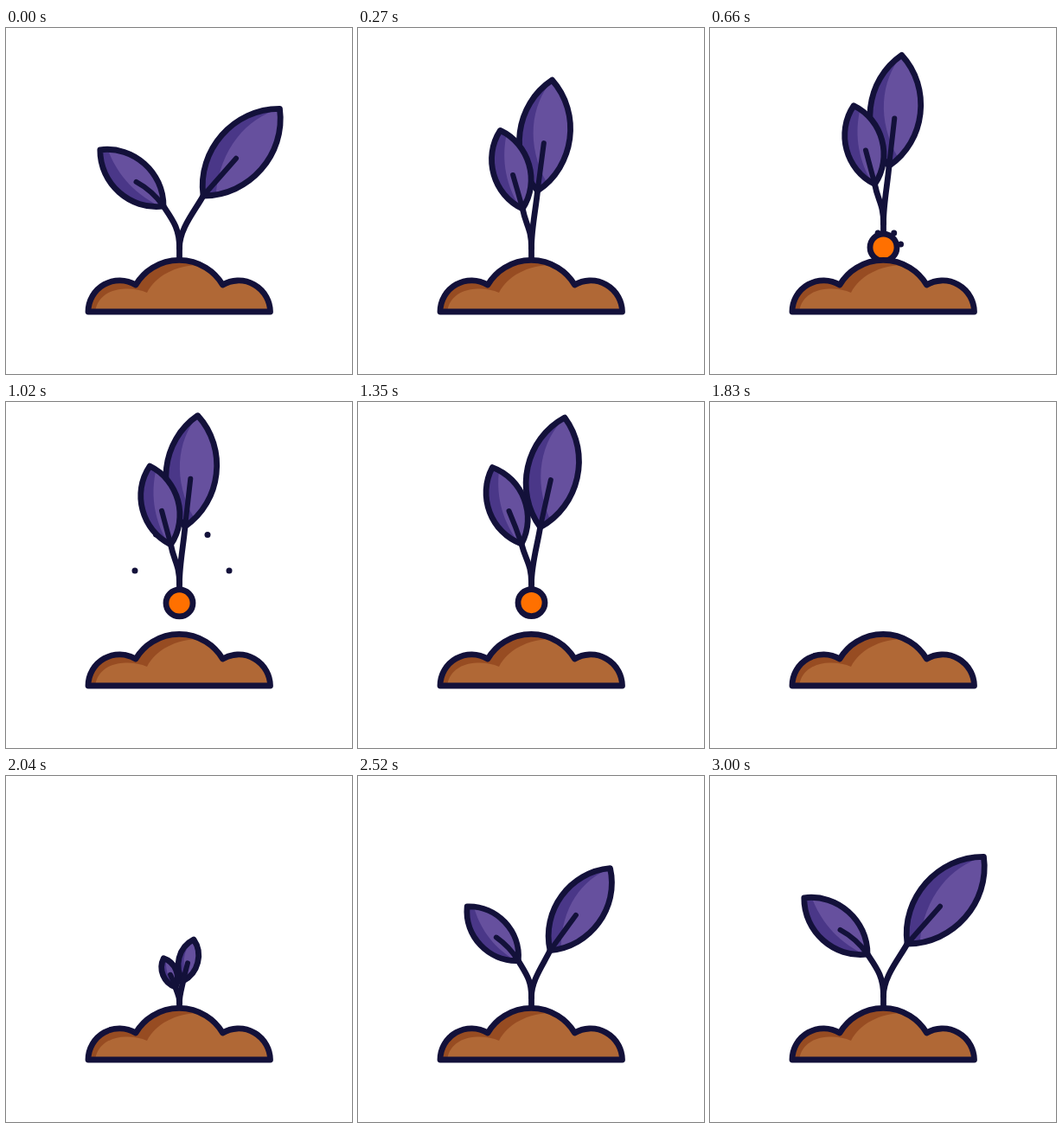
Animation, 400 px wide and 400 px high, one loop 3630 ms. Source, as an HTML page:

```html
<!DOCTYPE html>
<html lang="en">
<head>
<meta charset="utf-8">
<title>Sprout</title>
<style>
  html, body { margin: 0; width: 100%; height: 100%; overflow: hidden; background: #fff; }
  svg { display: block; width: 100vw; height: 100vh; }
  .line { fill: none; stroke: #13113a; stroke-width: 6.8; stroke-linecap: round; stroke-linejoin: round; }
  .vein { stroke-width: 6; }
  .dark { fill: #4a3788; }
  .light { fill: #66509e; }
</style>
</head>
<body>
<svg viewBox="0 0 400 400">
  <defs>
    <path id="mound" d="M95 328A36.300 36.300 0 0 1 150 297A58.500 58.500 0 0 1 250.500 297A36.500 36.500 0 0 1 305.500 328Z"/>
    <clipPath id="inside"><use href="#mound"/></clipPath>
  </defs>
  <g id="dots" fill="#13113a"></g>
  <g id="plant">
    <path id="trunk" class="line"/>
    <g id="right"></g>
    <g id="left"></g>
  </g>
  <circle id="seed" class="line" cx="200.500" r="15.500" style="fill:#ff7000"/>
  <g clip-path="url(#inside)">
    <rect x="90" y="260" width="220" height="70" fill="#974c22"/>
    <path fill="#b06836" d="M103 328C106 309 122 302 138 301.500Q152 301 163 306C173 287 195 274 226 274V260H320V328Z"/>
  </g>
  <use href="#mound" class="line"/>
</svg>
<script>
const LOOP = 3630, X = 200.5, GROUND = 266;
const $ = id => document.getElementById(id);
const mix = (a, b, p) => a + (b - a) * p;

const linear = p => p;
const inOut = p => (1 - Math.cos(Math.PI * p)) / 2;
const sineOut = p => Math.sin(Math.PI * p / 2);
const quadIn = p => p * p;
const cubicIn = p => p ** 3;
const growOut = p => 1 - (1 - p) ** 2.4;

// Each stop is [time, value, easing into it].
const tracks = {
  open: [[30, 1], [300, 0, inOut], [1110, 0], [1650, 0.42, inOut], [1830, 0]],
  size: [[1500, 1], [1650, 0.955, quadIn], [1830, 0, quadIn], [3000, 1, growOut]],
  lift: [[330, 0], [1080, 44.5, sineOut], [1300, 44.5], [1650, 38.5, quadIn], [1830, 0]],
  seed: [[330, 292], [1080, 232, sineOut], [1300, 232], [1830, 292, cubicIn]]
};

function at(stops, t) {
  if (t <= stops[0][0]) return stops[0][1];
  for (let i = 1; i < stops.length; i++) {
    const [t0, v0] = stops[i - 1], [t1, v1, ease = linear] = stops[i];
    if (t < t1) return mix(v0, v1, ease((t - t0) / (t1 - t0)));
  }
  return stops[stops.length - 1][1];
}

// Pairs hold the closed and the open pose, relative to the root.
// The shade is the curve from tip to base that bounds the dark side, in leaf lengths.
const leaves = {
  right: {
    x: [6.5, 27.5], y: [-78, -72], turn: [6.5, 41.3], length: [129, 134], belly: 0.3, bend: 0,
    shade: [[0, -1], [-0.16, -0.75], [-0.16, -0.4], [0.075, -0.08]]
  },
  left: {
    x: [-10, -18.5], y: [-57, -60], turn: [-15, -48.3], length: [94, 98], belly: 0.3, bend: 0.05,
    shade: [[0.06, -0.93], [-0.06, -0.7], [-0.13, -0.4], [-0.03, -0.03]]
  }
};

function addShape(parent, tag, className) {
  const el = document.createElementNS('http://www.w3.org/2000/svg', tag);
  if (className) el.setAttribute('class', className);
  return parent.appendChild(el);
}

for (const id in leaves) {
  const leaf = leaves[id];
  leaf.stem = addShape($(id), 'path', 'line');
  leaf.blade = addShape($(id), 'g');
  for (const part of ['light', 'dark', 'line', 'vein'])
    leaf[part] = addShape(leaf.blade, 'path', part === 'vein' ? 'line vein' : part);
}

function drawLeaf(leaf, open, size, root) {
  const pose = key => mix(...leaf[key], open);
  const x = X + pose('x') * size, y = root + pose('y') * size;
  const turn = pose('turn'), L = pose('length') * size, w = leaf.belly * L;
  const a = turn * 0.7 * Math.PI / 180, reach = 20 * size;
  const near = -0.26 * L, far = -0.74 * L;
  const leftEdge = `M0 0C${-w} ${near} ${-w} ${far} 0 ${-L}`;
  const outline = `${leftEdge}C${w} ${far} ${w} ${near} 0 0Z`;
  const [top, ...curve] = leaf.shade.map(([sx, sy]) => `${sx * L} ${sy * L}`);

  leaf.stem.setAttribute('d', `M${X} ${root - 12 * size}C${X} ${root - 34 * size} ` +
    `${x - Math.sin(a) * reach} ${y + Math.cos(a) * reach} ${x} ${y}`);
  leaf.blade.setAttribute('transform', `translate(${x} ${y}) rotate(${turn})`);
  leaf.light.setAttribute('d', outline);
  leaf.line.setAttribute('d', outline);
  leaf.dark.setAttribute('d', `${leftEdge}L${top}C${curve.join(' ')}Z`);
  leaf.vein.setAttribute('d', `M0 0Q${leaf.bend * open * L} ${-0.22 * L} 0 ${-0.43 * L}`);
}

const crumbs = [[-54.5, 195], [-30, 153], [29.5, 153.5], [54.5, 195]]
  .map(([dx, top]) => ({ dx, top, el: addShape($('dots'), 'circle') }));

function drawCrumbs(t) {
  const p = sineOut(Math.min(1, Math.max(0, (t - 570) / 450)));
  const r = t < 570 ? 0 : at([[1080, 3.5], [1290, 0]], t);
  for (const { dx, top, el } of crumbs) {
    el.setAttribute('cx', 203.5 + dx * p);
    el.setAttribute('cy', mix(275, top, p));
    el.setAttribute('r', r);
  }
}

function draw(t) {
  const size = at(tracks.size, t), seed = at(tracks.seed, t);
  const root = GROUND - at(tracks.lift, t);
  const open = t < 1830 ? at(tracks.open, t) : Math.max(0, (size - 0.2) / 0.8);

  $('plant').style.display = size < 0.02 ? 'none' : '';
  $('trunk').setAttribute('d', `M${X} ${root - 12 * size}V${Math.max(root, seed)}`);
  for (const id in leaves) drawLeaf(leaves[id], open, size, root);
  $('seed').setAttribute('cy', seed);
  drawCrumbs(t);
}

const start = performance.now();
function tick() {
  draw((performance.now() - start) % LOOP);
  requestAnimationFrame(tick);
}
tick();
</script>
</body>
</html>
```
